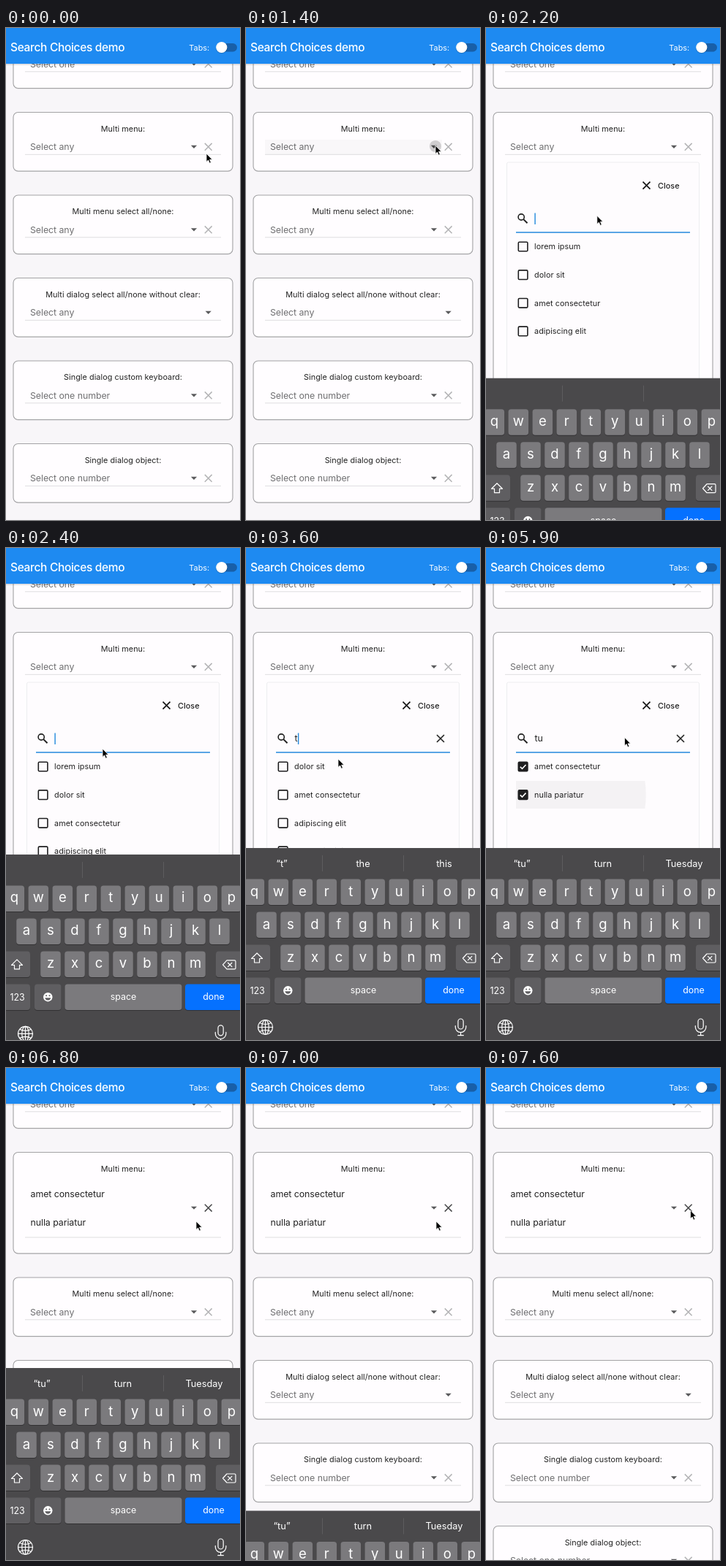
Recreate the animation shown at these times as an HTML page. Size 320 by 674 pixels, loop 8000 ms.

```html
<!DOCTYPE html>
<html lang="en">
<head>
<meta charset="utf-8">
<title>Search Choices demo</title>
<style>
html, body { margin: 0; width: 100%; height: 100%; overflow: hidden; background: #f8f6f9; }
svg { display: block; width: 320px; height: 674px; font-family: Inter, Roboto, "Liberation Sans", sans-serif; }
text { white-space: pre; }
.mid { text-anchor: middle; }
.label { font-size: 10.82px; letter-spacing: .06px; fill: #222; }
.field { font-size: 12.37px; letter-spacing: -.06px; }
.key { font-size: 18.5px; fill: #fff; }
.small { font-size: 12.4px; fill: #fff; }
.line { fill: none; stroke: #fff; stroke-width: 1.2; stroke-linecap: round; stroke-linejoin: round; }
</style>
</head>
<body>
<svg id="stage" viewBox="0 0 320 674">
  <defs>
    <clipPath id="row0"><rect x="41" y="281" width="238" height="37.5"/></clipPath>
    <clipPath id="row1"><rect x="41" y="319" width="238" height="38"/></clipPath>
  </defs>
  <rect width="320" height="674" fill="#f8f6f9"/>
  <g id="idle"></g>
  <g id="open"></g>
  <g id="done"></g>
  <g id="header"></g>
  <g id="keyboard"></g>
  <path id="cursor" d="M0 0V11.4L2.6 9L4.4 13.2L6.4 12.3L4.6 8.3H8.1Z" fill="#000" stroke="#fff" stroke-width=".8"/>
</svg>
<script>
const LOOP = 8000, STEP = 100;
const PITCH = 113.5, CARD_H = 80.5, GROWTH = 58;
const T = { press: 1300, open: 1500, focus: 2000, firstKey: 3300, secondKey: 4100,
            firstTick: 4600, secondTick: 5300, close: 6300, hide: 6800 };
const $ = id => document.getElementById(id);

// shape helpers
const text = (x, y, str, cls, extra = '') => `<text x="${x}" y="${y}" class="${cls}" ${extra}>${str}</text>`;
const rect = (x, y, w, h, fill, r = 0, extra = '') =>
  `<rect x="${x}" y="${y}" width="${w}" height="${h}" rx="${r}" fill="${fill}" ${extra}/>`;
const cross = (x, y, r, color, width) =>
  `<path d="M${x - r} ${y - r}l${2 * r} ${2 * r}m0 ${-2 * r}l${-2 * r} ${2 * r}" stroke="${color}" stroke-width="${width}"/>`;
const arrow = (x, y) => `<path d="M${x - 4.1} ${y - 2}h8.2l-4.1 4.1z" fill="#5a5a5c"/>`;
const rule = (x1, x2, y, color, width) =>
  `<path d="M${x1} ${y}H${x2}" stroke="${color}" stroke-width="${width}"/>`;

function frame(y, h) {
  return rect(10, y + 1, 300, h, '#000', 6.5, 'opacity=".16"') +
    rect(10, y, 300, h, '#fffdff', 6.5, 'stroke="#a3a3a5" stroke-width="1.1"');
}

function card(y, title, hint, { clear = true, height = CARD_H } = {}) {
  return frame(y, height) +
    text(160, y + 26.4, title, 'label mid') +
    text(33, y + 51.8, hint, 'field', 'fill="#707072"') +
    rule(26, 294, y + 57.8, '#dededf', 1) +
    arrow(clear ? 257 : 276.7, y + 47.3) +
    (clear ? cross(276.7, y + 47.3, 4.9, '#b4b4b6', 1.5) : '');
}

const first = card(2, '', 'Select one');
const others = [
  ['Multi menu select all/none:', 'Select any'],
  ['Multi dialog select all/none without clear:', 'Select any', { clear: false }],
  ['Single dialog custom keyboard:', 'Select one number'],
  ['Single dialog object:', 'Select one number'],
];
const rest = shift => others.map((c, i) => card(229 + shift + i * PITCH, ...c)).join('');

$('idle').innerHTML = first + card(115.5, 'Multi menu:', 'Select any') + rest(0) +
  '<g id="press">' + rect(26, 153, 242, 20, '#000', 0, 'opacity=".025"') +
  '<circle id="ripple" cx="259" cy="162" fill="#000" opacity=".17"/></g>';

$('done').innerHTML = first + frame(115.5, CARD_H + GROWTH) +
  text(160, 141.9, 'Multi menu:', 'label mid') +
  text(33.5, 177, 'amet consectetur', 'field', 'fill="#222"') +
  text(33.5, 215.5, 'nulla pariatur', 'field', 'fill="#222"') +
  rule(26, 294, 232, '#dededf', 1) + arrow(257, 191.7) +
  cross(276.7, 191.7, 4.9, '#4a4a4c', 1.5) + rest(GROWTH);

$('open').innerHTML = first + card(115.5, 'Multi menu:', 'Select any', { height: 640 }) +
  rect(28.5, 184, 263, 560, '#fefcfe', 2, 'stroke="#ededef" stroke-width="1"') +
  cross(219.5, 215.6, 5, '#111', 1.6) +
  text(235, 219.5, 'Close', 'label', 'font-weight="500"') +
  '<circle cx="48.2" cy="259" r="4.1" fill="none" stroke="#222" stroke-width="1.6"/>' +
  '<path d="M51.3 262.1l5.2 5.2" stroke="#222" stroke-width="2"/>' +
  rule(41, 279, 280, '#2289dc', 1.7) +
  text(66.5, 265.4, '', 'field', 'id="query" fill="#222"') +
  rect(0, 253.5, 1.4, 15.5, '#2289dc', 0, 'id="caret"') +
  '<g id="wipe">' + cross(266, 261, 5, '#222', 1.6) + '</g>' +
  '<circle id="splash0" cx="88" cy="300" clip-path="url(#row0)"/>' +
  '<circle id="splash1" cx="91" cy="338" clip-path="url(#row1)"/>' +
  '<g id="list"></g>';

$('header').innerHTML = rect(0, 0, 320, 51, '#000', 0, 'opacity=".1"') +
  rect(0, 0, 320, 49, '#1e8af1') +
  text(6, 32.2, 'Search Choices demo', '', 'font-size="15.46" font-weight="500" letter-spacing="-.3" fill="#fff"') +
  text(250.3, 30.8, 'Tabs:', 'label', 'style="fill:#fff"') +
  rect(289, 21, 27, 11.4, '#185fa8', 5.7) +
  '<circle cx="294.8" cy="27.2" r="7.9" opacity=".18"/><circle cx="294.8" cy="26.5" r="7.6" fill="#fff"/>';

// keyboard, drawn at its resting place
const LIGHT = '#7b7a7d', DARK = '#5f5e61';
const cap = (x, y, w, fill) => rect(x, y + 1, w, 35.5, '#323133', 4) + rect(x, y, w, 35.5, fill, 4);
const keyRow = (letters, x, y) => [...letters].map((c, i) =>
  cap(x + i * 33 - 13.8, y, 27.6, LIGHT) + text(x + i * 33, y + 23, c, 'key mid')).join('');

$('keyboard').innerHTML = rect(0, 411, 320, 300, '#4a494b') +
  '<path d="M104.5 421v22M215.5 421v22" stroke="#5d5c5e"/>' +
  [49, 160, 271].map((x, i) => text(x, 436.5, '', 'small mid', `id="tip${i}" style="font-size:12.8px"`)).join('') +
  keyRow('qwertyuiop', 11.3, 453.5) + keyRow('asdfghjkl', 28, 498.5) + keyRow('zxcvbnm', 61, 543.5) +
  cap(-4, 543.5, 37, DARK) + cap(287, 543.5, 37, DARK) +
  cap(-4, 588.5, 37, DARK) + cap(39, 588.5, 36.5, DARK) +
  cap(80.5, 588.5, 160, LIGHT) + cap(245, 588.5, 79, '#0571ff') +
  text(15.5, 610.8, '123', 'small mid') + text(160.5, 610.3, 'space', 'small mid') + text(284, 610.3, 'done', 'small mid') +
  '<path class="line" d="M15 555l-7.5 7.5h4v5.5h7v-5.5h4z"/>' +
  '<path class="line" d="M302 556h10.5q1.5 0 1.5 1.5v9q0 1.5-1.5 1.5H302l-5.5-6zM303.5 559.3l5.4 5.4m0-5.4l-5.4 5.4"/>' +
  '<circle cx="57.3" cy="606.3" r="6.2" fill="#fff"/>' +
  `<g fill="${DARK}"><circle cx="55.1" cy="604.4" r="1"/><circle cx="59.5" cy="604.4" r="1"/>` +
  '<path d="M53.3 607.3h8q-.8 3.4-4 3.4t-4-3.4z"/></g>' +
  '<g class="line"><circle cx="26.5" cy="656.5" r="10"/><ellipse cx="26.5" cy="656.5" rx="4.7" ry="10"/>' +
  '<path d="M26.5 646.5v20M16.5 656.5h20M18.8 650.5q7.7 4 15.4 0M18.8 662.5q7.7-4 15.4 0"/></g>' +
  '<g class="line"><rect x="290" y="645" width="7.2" height="14" rx="3.6"/>' +
  '<path d="M286.3 654.5v1.8a7.3 7.3 0 0 0 14.6 0v-1.8M293.6 663.7v4M289.8 667.7h7.6"/></g>';

// search results and suggestions per query
const results = {
  '': ['lorem ipsum', 'dolor sit', 'amet consectetur', 'adipiscing elit'],
  t: ['dolor sit', 'amet consectetur', 'adipiscing elit', 'tempor incididunt'],
  tu: ['amet consectetur', 'nulla pariatur'],
};
const tips = { '': ['', '', ''], t: ['“t”', 'the', 'this'], tu: ['“tu”', 'turn', 'Tuesday'] };

function item(name, i, ticked) {
  const y = 299.5 + i * 38.65;
  return rect(44.3, y - 6.3, 12.6, 12.6, ticked ? '#1f1f20' : 'none', 1.3, 'stroke="#1f1f20" stroke-width="1.6"') +
    (ticked ? `<path d="M46.8 ${y + .2}l2.7 2.7l5-5.4" fill="none" stroke="#fff" stroke-width="1.6"/>` : '') +
    text(66, y + 3.9, name, 'label');
}

// cursor stops: time, x, y
const stops = [
  [0, 274, 172], [900, 259, 161], [1600, 259, 161], [2400, 132, 275], [2900, 126, 289],
  [4000, 126, 289], [4500, 92, 302], [4700, 92, 302], [4900, 91, 335], [5600, 91, 338],
  [6100, 243, 217], [6400, 243, 217], [6800, 260, 210], [7100, 260, 210], [7600, 279.5, 195], [LOOP, 279.5, 195],
];
const clamp = v => Math.min(1, Math.max(0, v));
const smooth = p => p * p * (3 - 2 * p);

function cursorAt(t) {
  const i = stops.findIndex(s => s[0] > t);
  const [t0, x0, y0] = stops[i - 1], [t1, x1, y1] = stops[i];
  const p = smooth((t - t0) / (t1 - t0));
  return [x0 + (x1 - x0) * p, y0 + (y1 - y0) * p];
}

function keyboardDrop(t) {
  const rise = 1 - (1 - clamp((t - T.focus) / 700)) ** 4;
  const fall = smooth(clamp((t - T.hide) / 300));
  return 264 * (1 - rise + fall);
}

const show = (id, on) => $(id).setAttribute('display', on ? 'inline' : 'none');

function splash(id, age) {
  show(id, age > 0 && age < 800);
  $(id).setAttribute('r', Math.max(0, age * .213));
  $(id).setAttribute('opacity', .07 * (1 - clamp((age - 450) / 350)));
}

function draw(t) {
  const open = t >= T.open && t < T.close;
  show('idle', t < T.open);
  show('open', open);
  show('done', t >= T.close);
  show('press', t >= T.press);
  $('ripple').setAttribute('r', Math.max(0, 4 + (t - T.press) * .04));

  const query = t < T.firstKey ? '' : t < T.secondKey ? 't' : 'tu';
  const typed = [T.focus, T.firstKey, T.secondKey][query.length];
  $('query').textContent = query;
  $('caret').setAttribute('x', 66.4 + [0, 4.5, 11.7][query.length]);
  show('caret', open && t >= typed && (t - typed) % 1000 < 500);
  show('wipe', open && query);
  const ticks = query === 'tu' ? [t >= T.firstTick, t >= T.secondTick] : [];
  $('list').innerHTML = results[query].map((name, i) => item(name, i, ticks[i])).join('');
  splash('splash0', t - T.firstTick);
  splash('splash1', t - T.secondTick);

  tips[query].forEach((word, i) => $('tip' + i).textContent = word);
  $('keyboard').setAttribute('transform', `translate(0 ${keyboardDrop(t)})`);
  $('cursor').setAttribute('transform', `translate(${cursorAt(t)})`);
}

const start = performance.now();
function tick() {
  const t = Math.max(0, performance.now() - start) % LOOP;
  draw(Math.floor(t / STEP) * STEP);
  requestAnimationFrame(tick);
}
tick();
</script>
</body>
</html>
```
